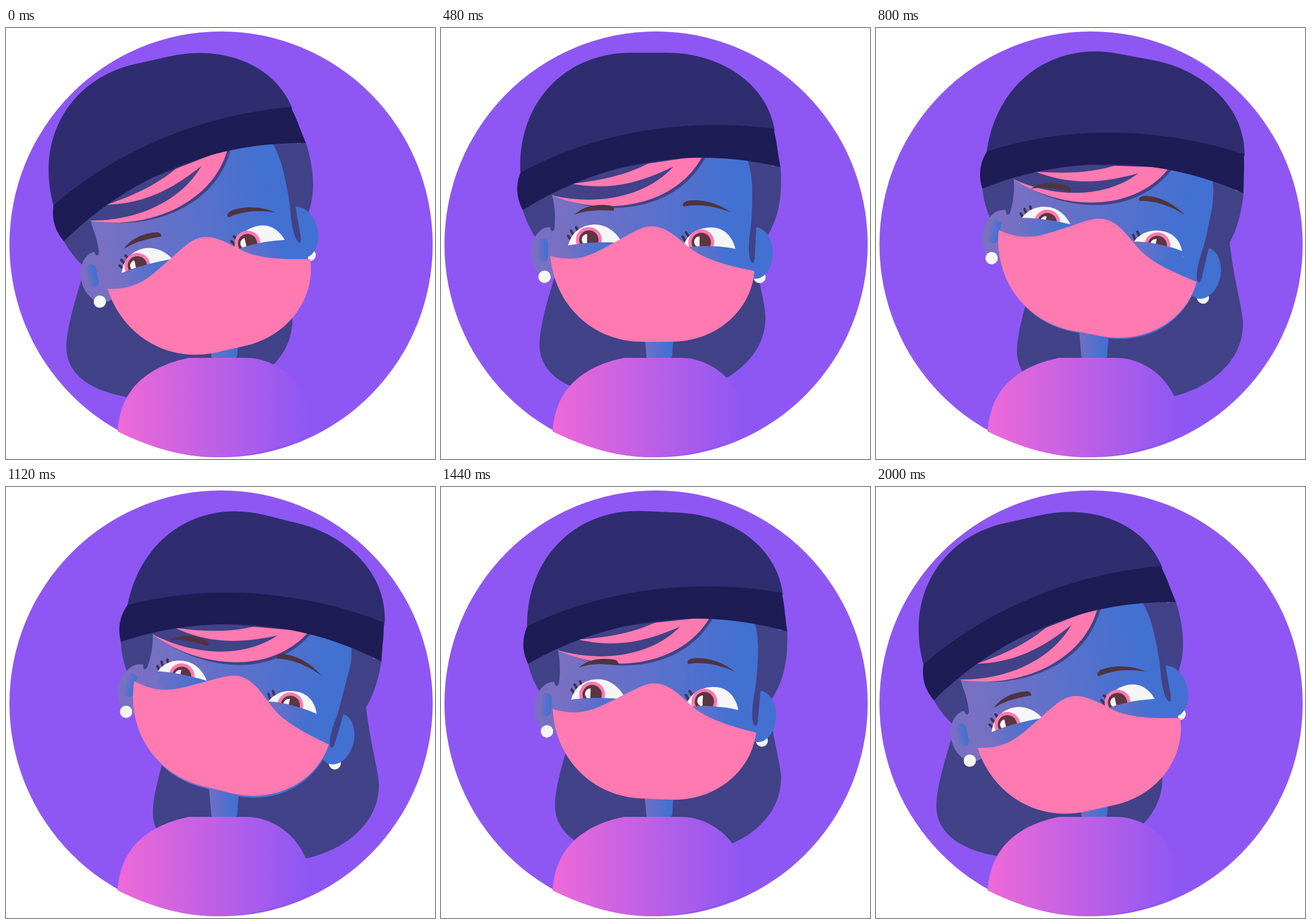
Write an HTML page without scripts that moves like this. It is 746x750 px and loops after 2040 ms.

```html
<!DOCTYPE html>
<html lang="en">
<head>
<meta charset="utf-8">
<title>Masked character</title>
<style>
@property --tilt { syntax: "<number>"; inherits: true; initial-value: -12.6; }
@property --hair-x { syntax: "<number>"; inherits: true; initial-value: -66; }
@property --hair-y { syntax: "<number>"; inherits: true; initial-value: 4; }
@property --look { syntax: "<number>"; inherits: true; initial-value: -6; }
@property --lid { syntax: "<number>"; inherits: true; initial-value: -3; }

html, body { margin: 0; width: 100%; height: 100%; overflow: hidden; background: #fff; }
svg {
  display: block; width: 100vw; height: 100vh;
  animation: tilt 2040ms infinite, sway 2040ms infinite;
}
.back-hair { transform: translate(calc(var(--hair-x) * 1px), calc(var(--hair-y) * 1px)); }
.head { transform-origin: 367px 531px; transform: rotate(calc(var(--tilt) * 1deg)); }

/* facial layers slide against the head by their depth */
.layer { transform: translate(calc(var(--tilt) * var(--dx) * -1px), calc(var(--tilt) * var(--dy) * -1px)); }
.jaw { --dx: .5; --dy: 1.12; }
.eyes { --dx: .5; --dy: 1.38; }
.mask { --dx: .65; --dy: 1.38; }
.brows { --dx: .68; --dy: 2.2; }
.irises { transform: translateX(calc(var(--look) * 1px)); }
.lids { transform: translateY(calc(var(--lid) * 1px)); }

.hair { fill: #414287; }
.pink { fill: #ff7ab0; }
.white { fill: #f6f6f6; }
.brow { fill: #4f3440; }
.lash { fill: none; stroke: #46304f; stroke-width: 4.5; stroke-linecap: round; }

@keyframes tilt {
  0% { --tilt: -12.6; animation-timing-function: cubic-bezier(.33, 0, .67, .58); }
  23.53% { --tilt: 0; animation-timing-function: cubic-bezier(.33, .335, .67, .726); }
  39.22% { --tilt: 10.5; animation-timing-function: cubic-bezier(.33, .51, .67, 1); }
  50% { --tilt: 14.4; animation-timing-function: cubic-bezier(.33, 0, .67, .15); }
  54.9% { --tilt: 13.85; animation-timing-function: cubic-bezier(.33, .13, .67, .645); }
  70.59% { --tilt: 2.45; animation-timing-function: cubic-bezier(.33, .37, .67, .71); }
  82.35% { --tilt: -5.75; animation-timing-function: cubic-bezier(.33, .47, .67, 1); }
  98.04%, 100% { --tilt: -12.6; }
}
@keyframes sway {
  0% { --hair-x: -66; --hair-y: 4; --look: -6; --lid: -3; animation-timing-function: cubic-bezier(.33, 0, .67, .49); }
  23.53% { --hair-x: 0; --hair-y: 0; --look: 0; --lid: 0; animation-timing-function: cubic-bezier(.33, .31, .67, .81); }
  39.22% { --hair-x: 74; --hair-y: 11; --look: 12; --lid: -9; animation-timing-function: cubic-bezier(.33, .6, .67, 1); }
  50% { --hair-x: 89; --hair-y: 16; --look: 11; --lid: -9; animation-timing-function: cubic-bezier(.33, 0, .67, .41); }
  54.9% { --hair-x: 84.5; --hair-y: 15; --look: 9; --lid: -7.5; animation-timing-function: cubic-bezier(.33, .15, .67, .53); }
  70.59% { --hair-x: 27.5; --hair-y: 3; --look: 0; --lid: 1; animation-timing-function: cubic-bezier(.33, .31, .67, .775); }
  82.35% { --hair-x: -36.5; --hair-y: -2; --look: -3; --lid: -2; animation-timing-function: cubic-bezier(.33, .65, .67, 1); }
  98.04%, 100% { --hair-x: -66; --hair-y: 4; --look: -6; --lid: -3; }
}
</style>
</head>
<body>
<svg viewBox="0 0 746 750" preserveAspectRatio="none">
  <defs>
    <linearGradient id="skin" gradientUnits="userSpaceOnUse" x1="190" y1="0" x2="510" y2="0">
      <stop stop-color="#7a70c2"/><stop offset="1" stop-color="#4271d2"/>
    </linearGradient>
    <linearGradient id="shade">
      <stop stop-color="#7370c4"/><stop offset=".85" stop-color="#4271d2"/>
    </linearGradient>
    <linearGradient id="shirt" gradientUnits="userSpaceOnUse" x1="200" y1="0" x2="526" y2="0">
      <stop stop-color="#ec69d8"/><stop offset="1" stop-color="#8e57f3"/>
    </linearGradient>
    <g id="iris">
      <circle class="pink" r="22.5"/>
      <circle r="16.8" fill="#5c3640"/>
      <path class="white" d="M-3-10.500A9.500 9.500 0 0 0-3 8.500Z"/>
    </g>
  </defs>

  <ellipse cx="374" cy="376.500" rx="368" ry="370.500" fill="#8e57f3"/>

  <path class="hair back-hair" d="M230 300C215 400 172 490 171 551C171 605 225 632 290 640L438 631C503 617 565 571 564 502C564 480 548 430 540 355Z"/>
  <path fill="url(#shade)" d="M351 500H407L402 570Q401 575 397 575H362Q357 575 357 570Z"/>
  <path fill="url(#shirt)" d="M194 702C198 640 232 592 318 574H417C472 574 533 620 532 705Q445 747 365 747Q285 747 194 702Z"/>

  <g class="head">
    <path class="hair" d="M140 250L142 317Q150 345 168 370L200 400H545L566 364C588 330 594 290 590 240Z"/>
    <circle class="white" cx="554" cy="433.500" r="10.500"/>
    <ellipse cx="546" cy="391.500" rx="31" ry="45" fill="#4271d2"/>
    <ellipse cx="190" cy="391" rx="33.500" ry="45" fill="#7a70c2"/>
    <rect x="168" y="366" width="18" height="41" rx="9" fill="url(#shade)"/>
    <path class="layer jaw" fill="url(#skin)" d="M188 190L191 397C198 480 262 545 350 545H400C480 545 539 490 544 420L548 190Z"/>
    <circle class="white" cx="180" cy="433" r="10.700"/>

    <path class="hair" d="M160 290L192 288C199 312 199 335 197 350Q192 359 189 346L166 350Z"/>
    <path class="hair" d="M532 225C538 245 541 262 541 285C541 320 540 340 536 365Q533 405 542 409Q546 406 546 391L548 347L572 340L575 225Z"/>
    <path class="hair" d="M180 270L192 290C285 332 413 321 462 220L300 200Z"/>
    <path class="pink" d="M192 291C285 330 409 311 455 222L374 228C330 255 280 265 228 271C300 285 355 265 404 241C355 295 270 310 192 291Z"/>

    <g class="layer eyes">
      <path class="lash" d="M227 370L221 362M232 363L226 353M239 356L235 347M425 371L420 363M431 363L426 356"/>
      <path class="white" d="M221 379C226 355 246 342 268 342C288 342 306 356 314 373L305 382H225Z"/>
      <path class="white" d="M421 380C428 358 448 347 470 347C492 347 507 363 512 385L500 390H430Z"/>
      <g class="irises">
        <use href="#iris" x="257" y="369"/>
        <use href="#iris" x="452.500" y="373"/>
      </g>
      <g class="lids" fill="url(#shade)">
        <path d="M219 379C245 373 285 372 315 374L312 404H245Q222 400 219 379Z"/>
        <path d="M418 384C440 378 485 378 515 385L506 408H430Z"/>
      </g>
    </g>
    <path class="pink layer mask" d="M190 397C240 410 265 393 300 374C330 358 348 345 366 345C395 345 415 370 440 388C465 405 505 415 545 423C540 490 480 546 400 546H350C262 546 197 480 190 397Z"/>

    <g class="layer brows">
      <path class="brow" d="M232 325C250 308 275 306 295 309Q303 313 300 318C280 317 255 316 232 325Z"/>
      <path class="brow" d="M504 321C480 303 450 297 428 301Q417 305 422 311C450 305 480 311 504 321Z"/>
    </g>

    <path fill="#2f2d70" d="M138 255C131 128 218 43 330 43H392C480 43 566 92 580 178L500 215L200 260Z"/>
    <path fill="#1d1c54" d="M138 252C270 180 430 155 578 175Q583 195 585 212L590 242C430 203 270 236 142 317Q125 285 138 252Z"/>
  </g>
</svg>
</body>
</html>
```
